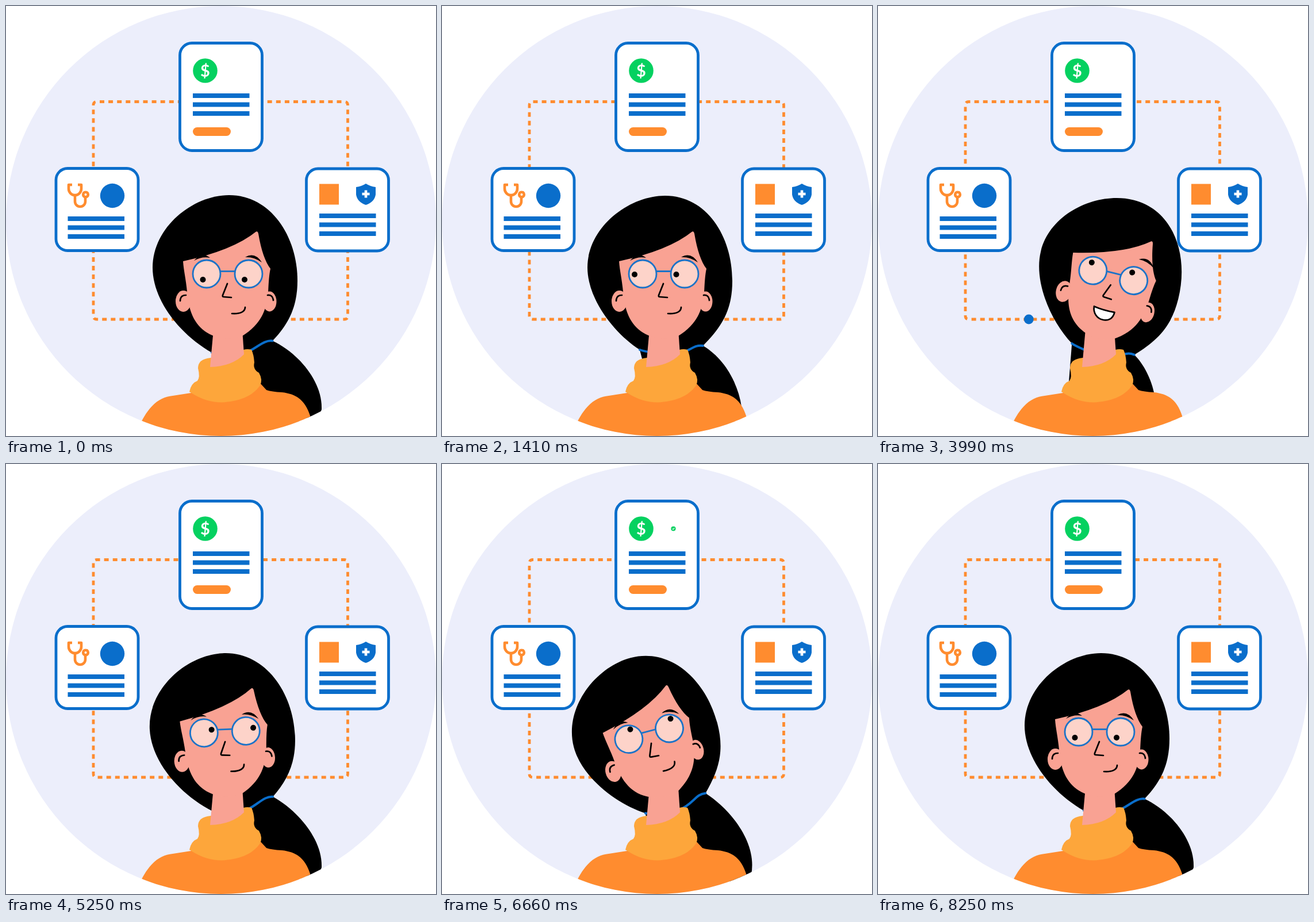
An HTML page that plays this animation: 748x748 px, repeating every 8280 ms.

```html
<!DOCTYPE html>
<html lang="en">
<head>
<meta charset="utf-8">
<title>Connected records</title>
<style>
  html, body { margin: 0; width: 100%; height: 100%; overflow: hidden; background: #fff; }
  svg { display: block; width: 100vw; height: 100vh; }
  .blue { fill: #0a6ecb; }
  .orange { fill: #ff8c2f; }
  .skin { fill: #f9a293; }
  .card { fill: #fff; stroke: #0a6ecb; stroke-width: 4.8; }
  .line { fill: none; stroke: #000; stroke-width: 2.7; stroke-linecap: round; stroke-linejoin: round; }
  .frame { fill: none; stroke: #1b73c8; stroke-width: 2.8; }
  #route { fill: none; stroke: #ff8c2f; stroke-width: 4.8; stroke-dasharray: 8 7.1; }
</style>
</head>
<body>
<svg viewBox="0 0 748 748">
  <defs>
    <clipPath id="disc"><circle cx="374" cy="374" r="374"/></clipPath>
    <g id="bars" class="blue">
      <rect width="98.5" height="8"/><rect y="15.5" width="98.5" height="8"/><rect y="31" width="98.5" height="8"/>
    </g>
    <path id="route" d="M373.250 166.500H158Q152 166.500 152 172.500V539Q152 545 158 545H373.250"/>
  </defs>

  <circle cx="374" cy="374" r="374" fill="#eceefb"/>
  <use href="#route"/>
  <use href="#route" transform="translate(746.5) scale(-1 1)"/>
  <circle id="dotL" class="blue" r="8.400"/>
  <circle id="dotR" class="blue" r="8.400"/>

  <g clip-path="url(#disc)">
    <path id="pony"/>
    <g class="turn">
      <path id="hair"/>
      <path id="tie" fill="none" stroke="#0a6ecb" stroke-width="4" stroke-linecap="round"/>
    </g>
    <path class="orange" d="M230 735C246 697 266 680 290 678L322 673L400 640L442 656L453 668Q462 671 480 672C506 675 521 686 530 716L520 760H230Z"/>
    <path fill="#fda63b" d="M356 612Q334 614 334 630Q338 646 333 652Q322 656 319 671C340 685 358 689.500 375 689.500C404 688 428 680 442 660Q447 650 440 638Q429 632 432 620Q431 606 427 598Q420 596 413 598L380 612Z"/>
    <path class="skin" d="M361 562L355 628Q393 627 414 606L411 562Z"/>
    <g class="turn">
      <path class="skin" d="M308 444Q395 425 435 392.500Q438 391 439 396C444 426 451 445 460 457Q457 470 456 500C453 520 450 550 411 574Q385 584 359 573C330 560 318 535 315 497C313 475 309 460 308 444Z"/>
      <ellipse class="skin" cx="308.500" cy="513.500" rx="13.500" ry="18.500"/>
      <ellipse class="skin" cx="458.500" cy="514" rx="12" ry="17.500"/>
      <path class="line" d="M303 513Q303 503 313 503M455 503Q464 502 465 512"/>
      <path id="browL" d="M327 443Q341 427 355 438Q341 435 327 443Z"/>
      <path id="browR" d="M416 437Q433 427 445 446Q431 436 416 437Z"/>
      <g fill="#fdd3c9"><circle cx="349" cy="466" r="24"/><circle cx="422" cy="466" r="24"/></g>
      <g id="pupils"><circle cx="349" cy="466" r="5"/><circle cx="421.500" cy="466" r="5"/></g>
      <g class="frame">
        <circle cx="349" cy="466" r="24"/><circle cx="422" cy="466" r="24"/><path d="M373 461.500H398"/>
      </g>
      <path class="line" d="M385 483L377 503Q376 506 379 506L392 507"/>
      <path id="smile" class="line" d="M393 535C407 536 416 532 416 524"/>
      <path id="laugh" class="line" style="fill:#fff" d="M366 526Q384 529 403 527.500C403 540 395 545 386 545C376 545 367 538 366 526Z"/>
    </g>
  </g>

  <rect class="card" x="87" y="282.500" width="143" height="143" rx="20"/>
  <g fill="none" stroke="#ff8c2f" stroke-width="4.600" stroke-linejoin="round">
    <path d="M115 311H109V318A11 11 0 0 0 131 318V311H125M120 329V340A9 9 0 0 0 138 340V334"/>
    <circle cx="138.500" cy="328" r="4.300"/>
  </g>
  <circle class="blue" cx="185" cy="330" r="21.200"/>
  <use href="#bars" x="107.500" y="366"/>

  <rect class="card" x="522.500" y="283" width="143" height="143" rx="20"/>
  <rect class="orange" x="545" y="309.500" width="34" height="36"/>
  <path class="blue" d="M626 309Q634 314 643 315V328Q641 341 626 346Q611 341 609 328V315Q618 314 626 309Z"/>
  <path d="M619.500 327H632.500M626 320.500V333.500" stroke="#fff" stroke-width="4.600"/>
  <use href="#bars" x="545" y="361"/>

  <g id="bill">
    <rect class="card" x="302.500" y="64.500" width="143" height="187" rx="21"/>
    <circle cx="346.500" cy="112.500" r="21.300" fill="#05d160"/>
    <text x="346.500" y="122.500" text-anchor="middle" font-family="Lato, 'Open Sans', sans-serif" font-weight="700" font-size="29" fill="#fff">$</text>
    <use href="#bars" x="325" y="152"/>
    <rect class="orange" x="325" y="211" width="66" height="15" rx="7.500"/>
    <g id="check">
      <circle r="20" fill="#05d160"/>
      <path d="M-9 0L-3 7L9 -7" fill="none" stroke="#fff" stroke-width="5"/>
    </g>
  </g>
</svg>
<script>
const LOOP = 8280, ROUND = 3750, SPEED = 0.256, MARCH = 0.05035;
const PIVOT = [385.5, 565];
const $ = id => document.getElementById(id);
const turning = document.querySelectorAll('.turn');
const mix = (a, b, k) => a + (b - a) * k;

// Eased value list at time t from rows of [time, ...values]
function track(rows, t) {
  let i = 0;
  while (i < rows.length - 2 && t >= rows[i + 1][0]) i++;
  const [a, b] = [rows[i], rows[i + 1]];
  const x = Math.min(1, Math.max(0, (t - a[0]) / (b[0] - a[0])));
  const k = x * x * (3 - 2 * x);
  return a.slice(1).map((v, n) => mix(v, b[n + 1], k));
}

// Rise, hold and fall, once in each round
function pulse(t, up, top, down, end) {
  const one = u => track([[up, 0], [top, 1], [down, 1], [end, 0]], u)[0];
  return Math.max(one(t), one(t - ROUND));
}

const tilt = [[0, 0], [1400, 0], [1950, 13.9], [4030, 13.9], [4600, 0],
  [4970, 0], [6000, -14.8], [7700, -14.8], [8230, 0]];

const gaze = [[0, -6.5, 10], [700, -12, 7], [1300, -14, 1], [1450, -14, 1], [2000, -13, -6],
  [2750, -8.7, -10.2], [2850, -8.7, -10.2], [3050, -5.3, -13.1], [4000, -5.3, -13.1], [4450, 9, 8],
  [5200, 13.5, -5], [5300, 13.5, -5], [6500, 6.8, -15.8], [7700, 6.8, -15.8], [8200, -6.5, 10]];

// Outer curve of the ponytail, its inner foot, and how far the hair is swept aside
const rest = [503, 600, 551, 650, 549, 702, 380, 660, 1];
const fall = [490, 612, 515, 655, 521, 697, 360, 660, 0];
const low = [462, 622, 476, 650, 481, 677, 332, 654, 0];
const swing = [497, 597, 549, 655, 538, 714, 365, 660, 0];
const tail = [[0, rest], [500, rest], [1300, fall], [1420, fall], [1900, low], [4030, low],
  [4700, rest], [5250, rest], [6200, swing], [7700, swing], [8230, rest]].map(([t, p]) => [t, ...p]);

function spin([x, y], deg) {
  const a = deg * Math.PI / 180, dx = x - PIVOT[0], dy = y - PIVOT[1];
  return [PIVOT[0] + dx * Math.cos(a) - dy * Math.sin(a), PIVOT[1] + dx * Math.sin(a) + dy * Math.cos(a)];
}

// Out from behind the head, into the side card, then on to the top card
function dotAt(u) {
  if (u < 1565) {
    const d = Math.min(SPEED * u, 363);
    return d < 172 ? [324 - d, 545] : [152, 717 - d];
  }
  const d = SPEED * (u - 1565);
  return [152 + Math.min(221, Math.max(0, d - 188)), Math.max(166.5, 354 - d)];
}

function place(el, x, y) { el.setAttribute('transform', `translate(${x} ${y})`); }

function drawHair(t, deg) {
  const [ax, ay, bx, by, tx, ty, fx, fy, m] = track(tail, t);
  const left = [mix(344, 358, m), mix(598, 603, m)];
  const right = [mix(454, 463.5, m), mix(591, 582.5, m)];
  const s = mix(-2, 0, m);
  $('hair').setAttribute('d', `M${left}C300 570 ${255 + s} 510 ${255 + s} 455` +
    `C${255 + s} 385 325 ${329 - s / 2} 388 ${329 - s / 2}` +
    `C460 ${329 - s / 2} ${507 + s} 400 ${507 + s} 478` +
    `C${507 + s} 525 490 555 ${right}L424 600L400 606Z`);
  $('tie').setAttribute('d', `M${left}Q${left[0] + 10} ${left[1] + 4} 400 608` +
    `C430 604 ${right[0] - 18} ${right[1] - 3} ${right}`);
  $('pony').setAttribute('d', `M${spin(left, deg)}L${spin(right, deg)}` +
    `C${ax} ${ay} ${bx} ${by} ${tx} ${ty}L${tx - 8} ${ty + 18}L${tx - 50} ${ty + 10}L${fx} ${fy}Z`);
}

function draw(t) {
  const [deg] = track(tilt, t);
  turning.forEach(g => g.setAttribute('transform', `rotate(${deg} ${PIVOT})`));
  drawHair(t, deg);

  const [gx, gy] = track(gaze, t);
  place($('pupils'), gx, gy);

  const lift = pulse(t, 2930, 3050, 4000, 4100);
  place($('browL'), 3 * lift, -9 * lift);
  place($('browR'), 6 * lift, -9 * lift);
  $('laugh').style.display = lift > 0.5 ? '' : 'none';
  $('smile').style.display = lift > 0.5 ? 'none' : '';

  // Dashes march up both sides towards the top card
  $('route').setAttribute('stroke-dashoffset', MARCH * t - 6);
  const [x, y] = dotAt(t < ROUND ? t : t - ROUND);
  place($('dotL'), x, y);
  place($('dotR'), 746.5 - x, y);

  const grow = 1 + 0.31 * pulse(t, 2912, 3035, 3560, 3760);
  $('bill').setAttribute('transform', `translate(374 158) scale(${grow}) translate(-374 -158)`);
  const tick = pulse(t, 2860, 3035, 3560, 3760);
  $('check').setAttribute('transform', `translate(402.5 112.5) scale(${tick})`);
}

const start = performance.now();
function frame(now) {
  draw(Math.max(0, now - start) % LOOP);
  requestAnimationFrame(frame);
}
draw(0);
requestAnimationFrame(frame);
</script>
</body>
</html>
```
